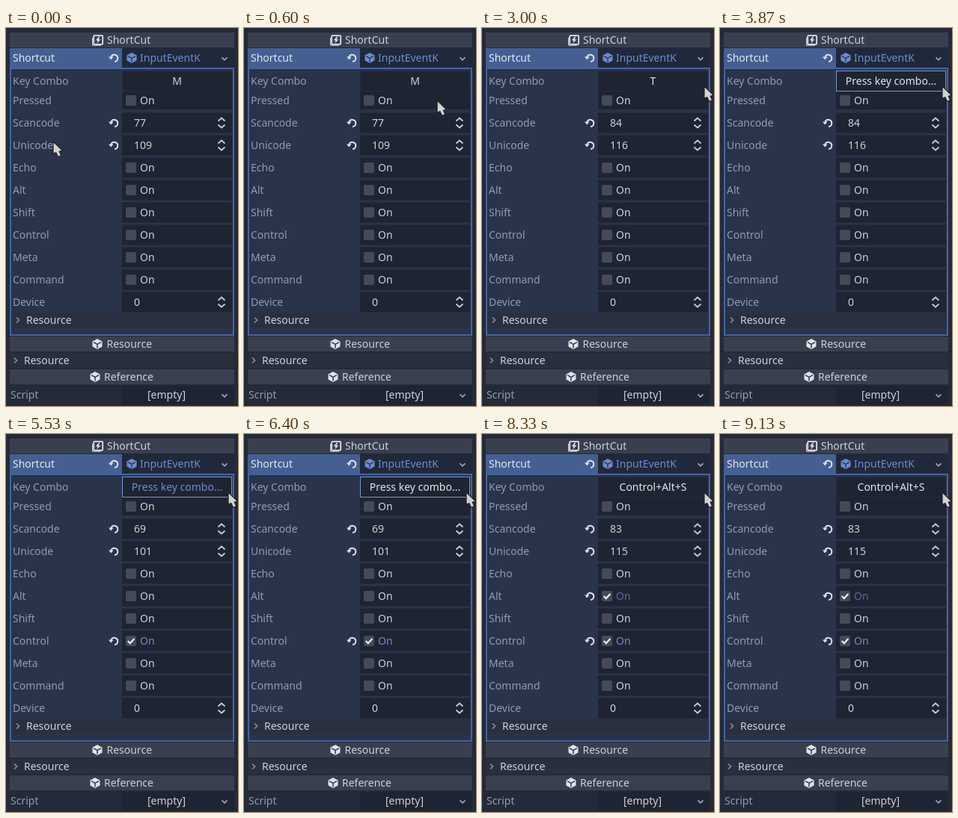
An HTML page that plays this animation: 310x506 px, repeating every 9600 ms.

```html
<!DOCTYPE html>
<html lang="en">
<head>
<meta charset="utf-8">
<title>Shortcut inspector</title>
<style>
html, body { margin: 0; width: 100%; height: 100%; overflow: hidden; background: #242a38; }
svg { display: block; width: 310px; height: 506px; }
text { font: 14px "Noto Sans", "Open Sans", sans-serif; fill: #cdd1d9; white-space: pre; }
.label { fill: #8f9cb3; }
.accent { fill: #6a8dd0; }
.mid { text-anchor: middle; }
.line { fill: none; stroke: #c8ccd4; stroke-width: 1.8; }
</style>
</head>
<body>
<svg id="stage" viewBox="0 0 310 506" xmlns="http://www.w3.org/2000/svg">
  <defs>
    <g id="cube">
      <path d="M0-7 6.5-3.6V3.6L0 7-6.5 3.6V-3.6Z"/>
      <path d="M-5-2.4 0 .3 5-2.4M0 .3V5.6" fill="none" stroke="#30384c" stroke-width="1.5"/>
    </g>
    <g id="revert" fill="none" stroke="#dde1e8" stroke-width="2">
      <path d="M-3.6-1.2A4.6 4.6 0 1 1 1 5"/>
      <path d="M-7-1.6H-.4L-3.7 2.4Z" fill="#dde1e8" stroke="none"/>
    </g>
    <path id="spin" class="line" d="M-4.5-2.5 0-6.5 4.5-2.5M-4.5 2.5 0 6.5 4.5 2.5"/>
    <path id="right" class="line" d="M-2-3.5 1.6 0-2 3.5" style="stroke:#8b92a0;stroke-width:1.5"/>
    <path id="down" class="line" d="M-3.5-1.6 0 1.8 3.5-1.6" style="stroke:#9da4b2"/>
  </defs>
  <g id="ui"></g>
  <path id="cursor" d="M0 0V16.5L3.8 14.6 6.6 20.5 10.6 18.6 8.2 13.2 12.6 12.4Z"
    fill="#d3d2d3" stroke="#20232c" stroke-width="1.2" stroke-linejoin="round"/>
</svg>
<script>
const NS = "http://www.w3.org/2000/svg";
const ui = document.getElementById("ui");
const cursor = document.getElementById("cursor");

function add(tag, attrs, content) {
  const el = document.createElementNS(NS, tag);
  for (const k in attrs) el.setAttribute(k, attrs[k]);
  if (content !== undefined) el.textContent = content;
  return ui.appendChild(el);
}
const box = (x, y, w, h, fill, more) => add("rect", { x, y, width: w, height: h, fill, ...more });
const text = (x, mid, str, cls = "") => add("text", { x, y: mid + 5, class: cls }, str);
const icon = (id, x, y, more) => add("use", { href: "#" + id, transform: `translate(${x} ${y})`, ...more });

const FIELD = "#1f2432", HEAD = "#393f4f", BLUE = "#6a8dd0";

// Category headers
function header(y, str, x) {
  box(5, y - 10, 300, 20, HEAD);
  text(x, y, str);
}
header(16, "ShortCut", 135);
box(117.2, 10.2, 12, 11.6, "none", { rx: 1, stroke: "#e0e2e7", "stroke-width": 1.8 });
add("path", { d: "M124 11.5 119.8 16.6H122.4L121.6 20.6 126.4 15.2H123.6L125.4 11.5Z", fill: "#e0e2e7" });
add("path", { d: "M115.6 13V23.2H127", fill: "none", stroke: "#e0e2e7" });

// Resource row
box(5, 27, 150, 27, "#455f92");
box(155, 27, 149, 27, "#20283b");
text(9, 40, "Shortcut").style.fill = "#e3e8f2";
icon("revert", 144, 40);
icon("cube", 168, 40, { fill: BLUE });
text(179, 40, "InputEventK", "accent");
icon("down", 292, 41);

// Nested panel
box(6, 54, 298, 357, "#29334a", { stroke: "#45649b", "stroke-width": 2 });
text(9, 71, "Key Combo", "label");
const button = box(155.5, 57.5, 146, 27, FIELD);
const combo = text(228.5, 71, "M", "mid");

function row(name, y, h = 27) {
  text(9, y, name, "label");
  box(155, y - h / 2, 147, h, FIELD);
}
function spinRow(name, y, value, changed) {
  row(name, y);
  if (changed) icon("revert", 144, y);
  icon("spin", 288, y);
  return text(171, y, value);
}
function checkRow(name, y, onColor) {
  row(name, y, name === "Pressed" ? 24 : 27);
  box(160, y - 7, 14, 14, "#444a58", { rx: 2 });
  const on = text(179, y, "On");
  const tick = add("path", { d: `M162.8 ${y}l3 3.2 5.6-6.2`, fill: "none", stroke: "#eef0f4", "stroke-width": 2.2 });
  const back = icon("revert", 144, y);
  return checked => {
    on.style.fill = checked ? onColor : "";
    tick.style.display = back.style.display = checked ? "" : "none";
  };
}
checkRow("Pressed", 97)(false);
const scancode = spinRow("Scancode", 127, "77", true);
const unicode = spinRow("Unicode", 157, "109", true);
checkRow("Echo", 187)(false);
const setAlt = checkRow("Alt", 217, "#566ba3");
checkRow("Shift", 247)(false);
const setControl = checkRow("Control", 277, BLUE);
checkRow("Meta", 307)(false);
checkRow("Command", 337)(false);
spinRow("Device", 367, "0");
box(8, 381, 294, 21, "#2a3040");
icon("right", 16, 391);
text(27, 391, "Resource");

// Lower part
header(423, "Resource", 134.5);
icon("cube", 122, 423, { fill: "#e0e2e7" });
box(5, 435, 300, 20, "#292f3d");
icon("right", 13, 445);
text(24, 445, "Resource");
header(467, "Reference", 131);
icon("cube", 119, 467, { fill: "#e0e2e7" });
text(6, 491, "Script", "label");
box(155, 479, 149, 25, FIELD);
text(189, 491, "[empty]");
icon("down", 292, 492);

// Time, pointer x and y
const path = [[70, 63, 152], [340, 168, 122], [600, 258, 97], [1000, 284, 82], [1440, 297, 78]];

const keys = [
  { at: 0, name: "M", scan: 77, uni: 109 },
  { at: 2400, name: "T", scan: 84, uni: 116 },
  { at: 4670, name: "Control+E", scan: 69, uni: 101, control: true },
  { at: 6670, name: "Alt+D", scan: 68, uni: 100, alt: true },
  { at: 8330, name: "Control+Alt+S", scan: 83, uni: 115, control: true, alt: true }
];
// Mouse down, mouse up, key arrives
const waits = [[1470, 1670, 2400], [3670, 3800, 4670], [5530, 5670, 6670], [7330, 7530, 8330]];
const LOOP = 9600;

function pointer(t) {
  if (t <= path[0][0]) return path[0].slice(1);
  for (let i = 1; i < path.length; i++) {
    const [t0, x0, y0] = path[i - 1], [t1, x1, y1] = path[i];
    if (t < t1) {
      const p = (t - t0) / (t1 - t0);
      return [x0 + (x1 - x0) * p, y0 + (y1 - y0) * p];
    }
  }
  return path[path.length - 1].slice(1);
}

function draw(t) {
  const key = keys.filter(k => t >= k.at).pop();
  const wait = waits.find(w => t >= w[0] && t < w[2]);
  const held = wait && t < wait[1];
  const [x, y] = pointer(t);
  const hover = y < 85;

  scancode.textContent = key.scan;
  unicode.textContent = key.uni;
  setAlt(!!key.alt);
  setControl(!!key.control);
  combo.textContent = wait ? "Press key combo..." : key.name;
  combo.style.fill = held ? BLUE : hover ? "#e2e6ee" : "";
  button.setAttribute("stroke", wait ? "#7395cd" : "none");
  cursor.setAttribute("transform", `translate(${x.toFixed(1)} ${y.toFixed(1)})`);
}

const start = performance.now();
function tick() {
  draw((performance.now() - start) % LOOP);
  requestAnimationFrame(tick);
}
draw(0);
requestAnimationFrame(tick);
</script>
</body>
</html>
```
